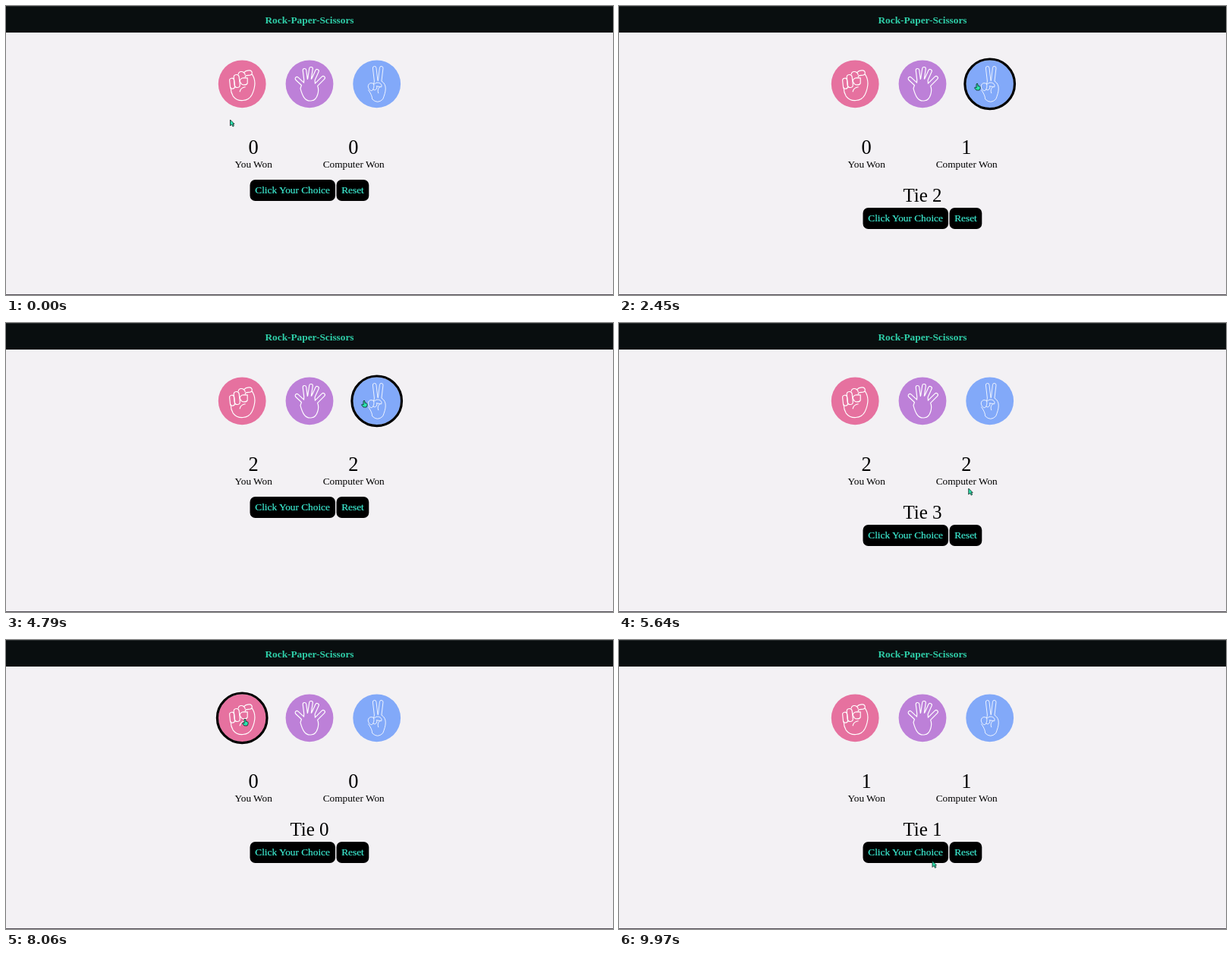
An HTML page that plays this animation: 800x381 px, repeating every 10000 ms.

```html
<!DOCTYPE html>
<html lang="en">
<head>
<meta charset="utf-8">
<title>Rock-Paper-Scissors</title>
<style>
  html, body { margin: 0; width: 100%; height: 100%; overflow: hidden; background: #f3f1f4; }
  svg { display: block; width: 800px; height: 381px; }
  text { font-family: "Liberation Serif", "Times New Roman", serif; font-size: 13.3px; text-anchor: middle; }
  .title { font-weight: bold; fill: #2fcfa9; }
  .score { font-size: 26.4px; }
  .tie { font-size: 25px; }
  .button text { fill: #3decd2; stroke: #3decd2; stroke-width: .2; }
  .ring { fill: none; stroke: #000; stroke-width: 3.2; visibility: hidden; }
  .hand { fill: none; stroke: #fff; stroke-width: 1.15; stroke-linecap: round; stroke-linejoin: round; }
  .thin { stroke-width: .85; }
  .cursor { fill: #2be3ae; stroke: #10231f; stroke-width: .8; stroke-linejoin: round; }
</style>
</head>
<body>
<svg viewBox="0 0 800 381">
  <rect y="380" width="800" height="1" fill="#555058"/>
  <rect width="800" height="35" fill="#090e0f"/>
  <rect width="800" height="1" fill="#25292b"/>
  <text class="title" x="400" y="22.800">Rock-Paper-Scissors</text>

  <g transform="translate(311.2 102.8)">
    <circle r="31.4" fill="#e6719f"/>
    <circle class="ring" r="32.8"/>
    <g class="hand">
      <rect x="-16" y="-9" width="6" height="14" rx="3" transform="rotate(-6)"/>
      <rect x="-10" y="-13" width="7" height="17" rx="3.500" transform="rotate(-6)"/>
      <path d="M-5 -13C-4 -18 3 -17 4 -12M-2 -2C-1 2 6 2 7 -1V-8H1C-3 -7 -4 -4 -2 -2"/>
      <path d="M2 -15C6 -19 14 -19 13 -14S4 -14 4 -9M13 -13C18 -6 18 3 13 14C8 24 -6 24 -12 16Q-15 11 -15 5M4 4Q-2 5 -3 10"/>
    </g>
  </g>

  <g transform="translate(400 102.8)">
    <circle r="31.4" fill="#bd80d8"/>
    <circle class="ring" r="32.8"/>
    <path class="hand" id="paper"/>
  </g>

  <g transform="translate(488.7 102.8)">
    <circle r="31.4" fill="#82a9f9"/>
    <circle class="ring" r="32.8"/>
    <g class="hand thin">
      <path id="scissors"/>
      <path d="M-4 0C-9 -4 -14 2 -10 7S-3 6 -4 0M-5 7C-2 10 1 6 0 3M-3 0C0 -4 8 -1 6 4L0 3M4 4Q0 7 2 12"/>
    </g>
  </g>

  <text class="score" id="you" x="326" y="194.700"></text>
  <text x="326.2" y="213.300">You Won</text>
  <text class="score" id="computer" x="457.800" y="194.700"></text>
  <text x="458.2" y="213.300">Computer Won</text>
  <text class="tie" id="tie" x="400" y="258"></text>
  <g id="buttons">
    <g class="button">
      <rect x="321.500" y="229" width="112.500" height="28" rx="7"/>
      <text x="377.600" y="247.300">Click Your Choice</text>
    </g>
    <g class="button">
      <rect x="435.500" y="229" width="42.800" height="28" rx="7"/>
      <text x="457" y="247.300">Reset</text>
    </g>
  </g>

  <g class="cursor" id="cursor">
    <path id="arrow" d="M0 0V8L2 6L3.500 9L5 8L3.500 5.500H5.500Z"/>
    <path id="pointer" d="M-1 1Q0 -1 1 1V3.500Q5 3 4 7L3 9H-1L-3.500 6Q-3 4 -1 6Z"/>
  </g>
</svg>
<script>
  const LOOP = 10000, SHIFT = 37;
  const $ = id => document.getElementById(id);
  const rings = [...document.querySelectorAll('.ring')];

  // One finger of a hand outline: up one side, round the tip, down the other.
  function finger(bx, by, tx, ty, r = 2.3) {
    const len = Math.hypot(tx - bx, ty - by);
    const nx = (ty - by) / len * r, ny = (bx - tx) / len * r;
    return `L${bx + nx} ${by + ny}L${tx + nx} ${ty + ny}` +
      `A${r} ${r} 0 0 1 ${tx - nx} ${ty - ny}L${bx - nx} ${by - ny}`;
  }
  $('paper').setAttribute('d', 'M-12 6' + finger(-9, 0, -16.5, -7) + finger(-5, -6, -6.5, -18) +
    finger(0, -7, 2, -20) + finger(5, -6, 10, -17) + finger(9, 1, 18, -8) +
    'C13 8 11 21 3 22C-7 24 -10 13 -12 6Z');
  $('scissors').setAttribute('d', 'M-4 0' + finger(-1, -4, -3, -21) + finger(4, -4, 6, -21) +
    'C14 1 12 10 8 20Q1 27 -6 20Q-6 15 -11 8');

  const spots = {
    start: [295.5, 150], rock: [315, 104], paper: [375, 102.5],
    scissors: [472, 102], reset: [455, 277], end: [413, 291.5]
  };

  // Each visit: time, place, and what the click there brings.
  const visits = [
    [-170, 'start'], [460, 'rock'], [800, 'rock', 'tie'], [1450, 'paper', 'lose'],
    [2400, 'scissors', 'tie'], [3170, 'paper', 'win'], [3680, 'rock', 'win'],
    [4250, 'paper', 'lose'], [4890, 'scissors', 'tie'], [7000, 'reset', 'reset'],
    [8150, 'rock', 'win'], [8600, 'paper', 'lose'], [9150, 'scissors', 'tie'], [LOOP, 'end']
  ];

  // The cursor leaves 200 ms after a click and arrives 100 ms before the next.
  function cursorAt(t) {
    const i = visits.findIndex(v => v[0] > t);
    const [t0, from] = visits[i - 1], [t1, to] = visits[i];
    const k = Math.min(1, Math.max(0, (t - t0 - 200) / (t1 - t0 - 300)));
    const ease = 1 - (1 - k) ** 3;
    return spots[from].map((v, axis) => v + (spots[to][axis] - v) * ease);
  }

  function scoreAt(t) {
    let score = { win: 0, lose: 0, tie: 0, tied: false };
    for (const [time, , result] of visits) {
      if (time > t || !result) continue;
      if (result === 'reset') score = { win: 0, lose: 0, tie: 0, tied: true };
      else {
        score[result]++;
        score.tied = result === 'tie';
      }
    }
    return score;
  }

  const show = (el, on) => { el.style.visibility = on ? 'visible' : 'hidden'; };

  function draw() {
    const t = performance.now() % LOOP;
    const [x, y] = cursorAt(t);
    const score = scoreAt(t);
    const shift = score.tied ? SHIFT : 0;

    $('you').textContent = score.win;
    $('computer').textContent = score.lose;
    $('tie').textContent = score.tied ? 'Tie ' + score.tie : '';
    $('buttons').setAttribute('transform', `translate(0 ${shift})`);

    const hovers = rings.map((_, i) => Math.hypot(x - 311.2 - i * 88.75, y - 102.8) < 32);
    rings.forEach((ring, i) => show(ring, hovers[i]));
    const onButton = x > 321 && x < 479 && y > 229 + shift && y < 254 + shift;
    const hot = onButton || hovers.includes(true);
    show($('pointer'), hot);
    show($('arrow'), !hot);
    $('cursor').setAttribute('transform', `translate(${x} ${y})`);
    requestAnimationFrame(draw);
  }
  draw();
</script>
</body>
</html>
```
